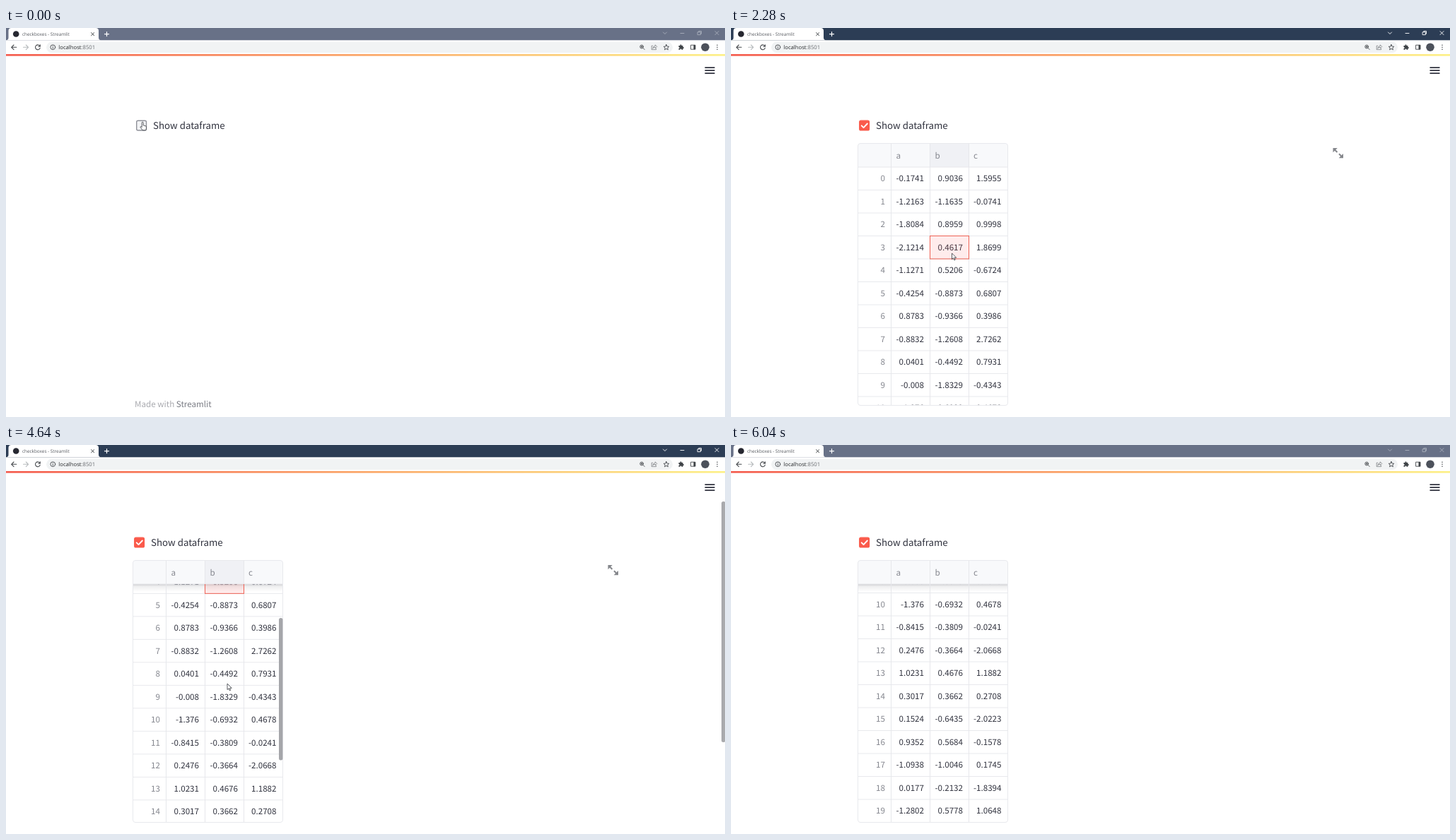
Animation of 1017 by 551 pixels, one loop 6400 ms. Source, as an HTML page:

```html
<!DOCTYPE html>
<html lang="en">
<head>
<meta charset="utf-8">
<title>checkboxes</title>
<style>
html, body { margin: 0; width: 100%; height: 100%; overflow: hidden; background: #fff; }
svg { display: block; }
text { text-rendering: geometricPrecision; white-space: pre; }
.page { font-family: "Noto Sans CJK JP", "Noto Sans CJK SC", "Noto Sans CJK", sans-serif; font-size: 11.64px; fill: #31333f; }
.ui { font-family: "Open Sans", "Noto Sans", sans-serif; }
.end { text-anchor: end; }
.dim { fill: #85878f; }
.line { fill: none; stroke-linecap: round; stroke-linejoin: round; }
</style>
</head>
<body>
<svg id="stage" width="1017" height="551" viewBox="0 0 1017 551">
  <defs>
    <linearGradient id="rainbow">
      <stop offset="0" stop-color="#f4594b"/>
      <stop offset=".5" stop-color="#fba565"/>
      <stop offset="1" stop-color="#fdf086"/>
    </linearGradient>
    <linearGradient id="shade" x2="0" y2="1">
      <stop offset="0" stop-color="#31333f" stop-opacity=".24"/>
      <stop offset=".3" stop-color="#31333f" stop-opacity=".08"/>
      <stop offset="1" stop-color="#31333f" stop-opacity="0"/>
    </linearGradient>
    <clipPath id="frame"><rect x="179.5" y="163.5" width="212" height="371" rx="3.5"/></clipPath>
    <clipPath id="window"><rect x="179" y="197" width="213" height="337.5"/></clipPath>
    <filter id="blur" x="-20%" y="-50%" width="140%" height="220%"><feGaussianBlur stdDeviation="5"/></filter>
  </defs>
  <rect width="1017" height="551" fill="#fff"/>

  <g id="chrome">
    <rect id="bar" width="1017" height="17.3"/>
    <path d="M0 17.3Q3.5 17.3 3.5 13.5V4Q3.5 0 7.500 0H127Q131 0 131 4V13.500Q131 17.300 134.500 17.300Z" fill="#fff"/>
    <circle cx="14.200" cy="8.500" r="4.300" fill="#262730"/>
    <text class="ui" x="23" y="11" font-size="6.400" fill="#55585e">checkboxes - Streamlit</text>
    <g class="line" stroke-width="1">
      <path d="M120.600 6.700l4 4m0-4l-4 4" stroke="#3c4043"/>
      <path d="M139.500 8.600h6m-3-3v6" stroke="#fff" stroke-width="1.200"/>
      <path id="controls" stroke-width=".9" d="M929.500 6l2.500 2.500l2.500-2.500M954 7.500h5M978.500 5.800h3.800v3.800h-3.800zM979.800 5.600v-1.200h3.700v3.800h-1M1003 4.600l5 5m0-5l-5 5"/>
    </g>
    <rect x="57" y="19.700" width="886" height="15.300" rx="7.650" fill="#f1f3f4"/>
    <g class="line" stroke="#46494d" stroke-width="1.100">
      <path d="M14.800 27.300h-7m3.200-3.300l-3.300 3.300l3.300 3.300"/>
      <path d="M24.500 27.300h7m-3.200-3.300l3.300 3.300l-3.300 3.300" stroke="#b7babd"/>
      <path d="M47.900 25.600A3.400 3.400 0 1 0 48.200 28.300M48.300 23.700v2.500h-2.500"/>
      <circle cx="66.300" cy="27.200" r="3.400" stroke-width=".9"/>
      <path d="M66.300 27v2M66.300 25.400v.1" stroke-width=".9"/>
      <circle cx="899.200" cy="26.500" r="2.400" stroke-width=".9"/>
      <path d="M901.200 28.500l2 2M898.100 26.500h2.200m-1.100-1.100v2.200" stroke-width=".9"/>
      <path d="M914.800 25.200h-1.600v5.400h6.400v-1.500M914.900 28.600q.4-3 3.400-3.200v-1.600l2.500 2.600l-2.500 2.500v-1.600q-2 0-3.400 1.300z" stroke-width=".7" stroke="#6d7074"/>
      <path d="M934 23.500l1.100 2.500l2.700.3l-2 1.800l.6 2.700l-2.400-1.400l-2.400 1.400l.6-2.700l-2-1.800l2.700-.3z" stroke-width=".9"/>
      <rect x="969" y="24.200" width="6" height="6" stroke-width=".9"/>
    </g>
    <path d="M951.500 25h2q-.2-1.700 1-1.700t1 1.700h2v2q1.400-.1 1.400 1t-1.400 1v1.800h-1.900q0-1.200-1.100-1.200t-1.100 1.200h-1.900v-1.900q1.200 0 1.200-1t-1.200-1z" fill="#3f4347"/>
    <path d="M972.500 24h2.500v6.200h-2.500z" fill="#3f4347"/>
    <circle cx="989" cy="27.200" r="5.800" fill="#4c515b"/>
    <path d="M1006 24.200v.1m0 2.900v.1m0 2.900v.1" class="line" stroke="#3f4347" stroke-width="1.500"/>
    <text class="ui" x="74.300" y="30" font-size="7.700" fill="#26282b">localhost<tspan fill="#6a6d71">:8501</tspan></text>
    <rect y="37" width="1017" height="2.600" fill="url(#rainbow)"/>
  </g>

  <path d="M988.500 56.200h14M988.500 60.200h14M988.500 64.200h14" stroke="#31333f" stroke-width="1.700"/>
  <g id="option">
    <rect id="box" x="184.700" y="131.200" width="13.800" height="13.800" rx="2"/>
    <path id="tick" class="line" d="M187.700 138.300l2.800 2.800l5.300-5.600" stroke="#fff" stroke-width="1.900"/>
    <text class="page" x="208" y="143" style="font-size:13.300px">Show dataframe</text>
  </g>
  <text id="footer" class="page" x="182" y="536.700" style="fill:#a9aaaf">Made with <tspan fill="#7b7d85">Streamlit</tspan></text>

  <g id="table">
    <g clip-path="url(#frame)">
      <g clip-path="url(#window)"><g id="rows"></g></g>
      <rect id="shadow" x="179" y="197" width="213" height="11" fill="url(#shade)"/>
      <rect x="179" y="163" width="213" height="34" fill="#f8f9fb"/>
      <rect id="column" x="281.500" y="163" width="55" height="34" fill="#f0f1f5"/>
      <path d="M179 197H392M226.500 163V535M281.500 163V535M336.500 163V535" stroke="#e6e7eb"/>
      <g class="page"><text class="dim" x="233.600" y="184.600">a</text><text class="dim" x="288.400" y="184.600">b</text><text class="dim" x="343" y="184.600">c</text></g>
    </g>
    <rect x="179.500" y="163.500" width="212" height="371" rx="3.500" fill="none" stroke="#e8e9ed"/>
    <g clip-path="url(#window)"><rect id="cell" x="281.500" width="55" height="32.500" fill="#ff4b4b" fill-opacity=".1" stroke="#ee6255"/></g>
    <rect id="thumb" x="386" width="5.400" height="201.500" rx="2.500" fill="#a5a6aa"/>
  </g>
  <rect id="scrollbar" x="1012" y="80" width="5.500" height="341" rx="2.500" fill="#a9aaad"/>
  <g id="expand" fill="#85878c" stroke="#85878c">
    <path d="M851.500 170h6.300l-6.300 6.300zM866 184.200h-6.300l6.300-6.300z" stroke="none"/>
    <path d="M853.500 172l4 4M864 182.200l-4-4" stroke-width="2"/>
  </g>

  <g id="popup">
    <rect x="281" y="299" width="159" height="36" fill="#31333f" opacity=".17" filter="url(#blur)"/>
    <rect x="279.500" y="292.500" width="161.500" height="36.500" rx="2.500" fill="#fff" stroke="#ee6a58" stroke-width="1.200"/>
    <text class="page" x="287.700" y="314.800">0.4617198114478398</text>
  </g>

  <g id="pointer" stroke="#33363d" fill="#fff" stroke-linejoin="round">
    <path id="arrow" stroke-width=".8" d="M0 0V8.600L2 6.800L3.300 9.900L4.700 9.300L3.400 6.300H6.200Z"/>
    <path id="hand" stroke-width=".8" d="M-1 .9a1 1 0 0 1 2 0V4.600l2.900.6q1.300.3 1.300 1.600v1.800q0 1.600-.9 2.900H0Q-1.200 9.600-3.200 7.400q-.3-.9.600-1.100q.7 0 1.600 1z"/>
  </g>
</svg>
<script>
const LOOP = 6400, ROW = 32.5, TOP = 197, MAX = 312.5;
const el = {};
document.querySelectorAll("[id]").forEach(n => el[n.id] = n);

const values = `-0.1741 0.9036 1.5955 -1.2163 -1.1635 -0.0741 -1.8084 0.8959 0.9998
-2.1214 0.4617 1.8699 -1.1271 0.5206 -0.6724 -0.4254 -0.8873 0.6807 0.8783 -0.9366 0.3986
-0.8832 -1.2608 2.7262 0.0401 -0.4492 0.7931 -0.008 -1.8329 -0.4343 -1.376 -0.6932 0.4678
-0.8415 -0.3809 -0.0241 0.2476 -0.3664 -2.0668 1.0231 0.4676 1.1882 0.3017 0.3662 0.2708
0.1524 -0.6435 -2.0223 0.9352 0.5684 -0.1578 -1.0938 -1.0046 0.1745 0.0177 -0.2132 -1.8394
-1.2802 0.5778 1.0648`.split(/\s+/);
const edges = [273, 328, 382.5];

let rows = "";
for (let i = 0; i < 20; i++) {
  const y = TOP + i * ROW, base = y + 20.4;
  rows += `<path d="M179 ${y + ROW}H392" stroke="#e8e9ed"/>
    <text class="page end"><tspan class="dim" x="218" y="${base}">${i}</tspan></text>` +
    edges.map((x, c) => `<text class="page end" x="${x}" y="${base}">${values[i * 3 + c]}</text>`).join("");
}
el.rows.innerHTML = rows;

// Keys are [time, ...numbers], eased between neighbours.
const path = [
  [1040, 193.2, 133.3], [1360, 252, 452], [1680, 287, 271], [1840, 312.5, 319],
  [2880, 312.5, 319], [3080, 315, 338], [3600, 315, 338], [4200, 334.5, 354.5],
  [4320, 334.5, 354.5], [4480, 313, 338], [5440, 313, 338], [5960, 338, 560]
];
const wheel = [[4320, 0], [4920, 270], [5080, MAX]];

const clamp = v => Math.max(0, Math.min(1, v));
const ramp = (t, a, b) => clamp((t - a) / (b - a));
const within = (t, a, b) => t >= a && t < b;

function track(keys, t) {
  const n = keys.findIndex(k => k[0] > t);
  if (n === 0) return keys[0].slice(1);
  if (n < 0) return keys[keys.length - 1].slice(1);
  const a = keys[n - 1], b = keys[n];
  const p = ramp(t, a[0], b[0]), s = p * p * (3 - 2 * p);
  return a.slice(1).map((v, i) => v + (b[i + 1] - v) * s);
}

function set(node, attrs) {
  for (const k in attrs) node.setAttribute(k, attrs[k]);
}
function show(node, on) {
  node.style.display = on ? "" : "none";
}

function draw(t) {
  const active = within(t, 80, 6000);
  const checked = t >= 280, loaded = t >= 440;
  const [x, y] = track(path, t), [scroll] = track(wheel, t);
  const inTable = t > 1040 && y > 164 && y < 535;
  const overPopup = within(t, 2280, 2980);

  set(el.bar, { fill: active ? "#2c3d55" : "#687187" });
  set(el.controls, { stroke: active ? "#fff" : "#a9afbb" });

  set(el.option, { transform: `translate(${loaded ? -3 : 0} 0)` });
  set(el.box, checked
    ? { fill: "#fa5a4b", stroke: "#fa5a4b", "stroke-width": 1.2 }
    : { fill: "#f3f4f6", stroke: "#8f9199", "stroke-width": 1.4 });
  show(el.tick, checked);
  show(el.footer, !loaded);

  show(el.table, loaded);
  set(el.table, { opacity: ramp(t, 400, 600) });
  set(el.rows, { transform: `translate(0 ${-scroll})` });
  show(el.shadow, scroll > 0);
  show(el.column, within(t, 2280, 5840));
  show(el.cell, within(t, 2000, 5840));
  set(el.cell, {
    y: TOP + ROW * (t < 3720 ? 3 : 4) - scroll,
    opacity: ramp(t, 1960, 2120)
  });
  show(el.thumb, inTable && !overPopup);
  set(el.thumb, { y: 164 + scroll / MAX * 169.5 });
  show(el.scrollbar, loaded && t < 5920 && !overPopup);
  show(el.expand, inTable);

  show(el.popup, within(t, 2320, 3720));
  set(el.popup, { opacity: ramp(t, 2300, 2440) });

  const hand = y < 150;
  show(el.pointer, t < 5960);
  show(el.hand, hand);
  show(el.arrow, !hand);
  set(el.pointer, { transform: `translate(${x} ${y})` });
}

function tick() {
  draw(performance.now() % LOOP);
  requestAnimationFrame(tick);
}
tick();
</script>
</body>
</html>
```
